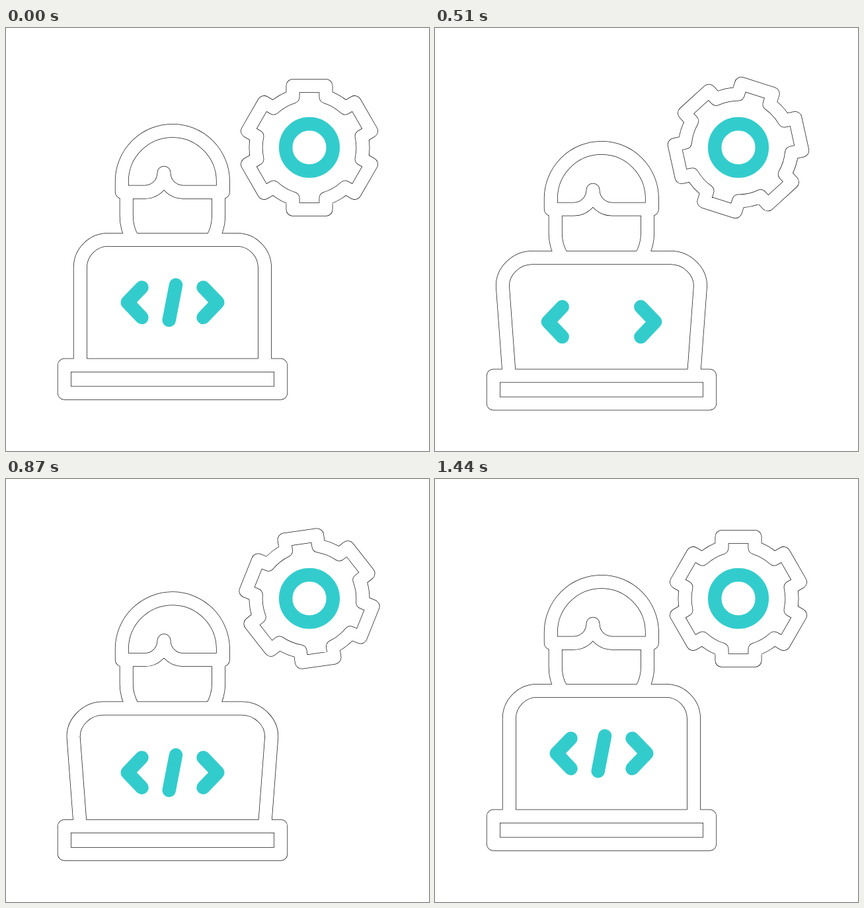
An HTML page for the animation above (1.47 s loop, 640 px wide and 640 px high).

```html
<!DOCTYPE html>
<html lang="en">
<head>
<meta charset="utf-8">
<title>Developer icon</title>
<style>
  html, body { margin: 0; width: 100%; height: 100%; overflow: hidden; background: #fff; }
  svg { display: block; width: 100vw; height: 100vh; }
  .edge { stroke: #1c1c1c; stroke-width: 20.9; }
  .face { stroke: #fff; stroke-width: 19.4; }
  .teal { stroke: #33cccc; stroke-width: 20.5; }
</style>
</head>
<body>
<svg viewBox="0 0 640 640" fill="none" stroke-linejoin="round">
  <defs>
    <g id="body">
      <g id="head">
        <path d="M182.2 248.2V284A70 70 0 0 0 191.7 319.5M321.6 248.2V284A70 70 0 0 1 312.1 319.5"/>
        <path d="M175.3 248.2V232A76.55 76.55 0 0 1 328.4 232V248.2H268A29 29 0 0 1 239 219.2A29 29 0 0 1 210 248.2Z"/>
      </g>
      <path id="screen"/>
      <rect id="base" x="88.3" y="510.3" width="327.4" height="42"/>
    </g>
    <path id="gear"/>
  </defs>
  <use href="#body" class="edge"/>
  <use href="#body" class="face"/>
  <use href="#gear" class="edge"/>
  <use href="#gear" class="face"/>
  <circle class="teal" cx="459" cy="180.8" r="35.8"/>
  <g id="code" class="teal" stroke-linecap="round">
    <path id="left" d="M205.5 392.5L183.7 415.2L205.5 438"/>
    <path id="slash" d="M257 388.7L246.7 442"/>
    <path id="right" d="M298.5 392.5L320.3 415.2L298.5 438"/>
  </g>
</svg>
<script>
const LOOP = 1470, STEP = 30;
const el = id => document.getElementById(id);
const shift = (id, x, y) => el(id).setAttribute('transform', `translate(${x} ${y})`);

// Cubic easing with control points (a, 0) and (b, 1)
function ease(a, b) {
  return x => {
    if (x <= 0) return 0;
    if (x >= 1) return 1;
    let lo = 0, hi = 1, s;
    for (let i = 0; i < 24; i++) {
      s = (lo + hi) / 2;
      const u = 1 - s;
      if (3 * u * u * s * a + 3 * u * s * s * b + s * s * s < x) lo = s; else hi = s;
    }
    return s * s * (3 - 2 * s);
  };
}
const soft = ease(0.6, 0.4), firm = ease(0.667, 0.333), slow = ease(0.5, 0.4);

// Goes 0 -> 1 until `peak`, then back to 0 at `end`
const swing = (t, peak, end, out = firm, back = out) =>
  t < peak ? out(t / peak) : 1 - back((t - peak) / (end - peak));

function gearPath() {
  const half = 25, root = 77, tip = 93.5;
  const corners = [[-half, -root], [-half, -tip], [half, -tip], [half, -root]];
  let d = '';
  for (let i = 0; i < 6; i++) {
    const c = Math.cos(i * Math.PI / 3), s = Math.sin(i * Math.PI / 3);
    corners.forEach(([x, y], j) => {
      const cmd = j ? 'L' : i ? 'A81 81 0 0 1 ' : 'M';
      d += `${cmd}${(x * c - y * s).toFixed(2)} ${(x * s + y * c).toFixed(2)}`;
    });
  }
  return d + `A81 81 0 0 1 ${-half} ${-root}Z`;
}

function screenPath(base, tilt) {
  const top = 320.4 + base + 12.5 * tilt;
  const foot = 510.3 + base;
  const side = top + 42 + 2 * tilt;
  const wide = 11 * tilt, bend = 42 + 3 * tilt;
  const l = 112.3 - wide, r = 391.5 + wide, k = 0.45 * bend;
  return `M112.3 ${foot}L${l} ${side}C${l - tilt} ${side - 23} ${l + k} ${top} ${l + bend} ${top}` +
    `H${r - bend}C${r - k} ${top} ${r + tilt} ${side - 23} ${r} ${side}L391.5 ${foot}`;
}

function draw(t) {
  const base = 17.6 * swing(t, 720, 1170);
  const tilt = swing(t, 720, 1440, firm, slow);
  const spread = 17 * swing(t, 360, 750, soft);
  shift('head', 0, 28.8 * swing(t, 720, 1200));
  shift('base', 0, base);
  el('screen').setAttribute('d', screenPath(base, tilt));
  shift('code', 0, base + 15 * tilt);
  shift('left', -spread, 0);
  shift('right', spread, 0);
  el('slash').setAttribute('visibility', t >= 390 && t < 630 ? 'hidden' : 'visible');
  el('gear').setAttribute('transform', `translate(459 181) rotate(${180 * soft(t / 1080)})`);
}

el('gear').setAttribute('d', gearPath());
const start = performance.now();
function tick() {
  const t = (performance.now() - start) % LOOP;
  draw(Math.floor(t / STEP) * STEP);
  requestAnimationFrame(tick);
}
tick();
</script>
</body>
</html>
```
